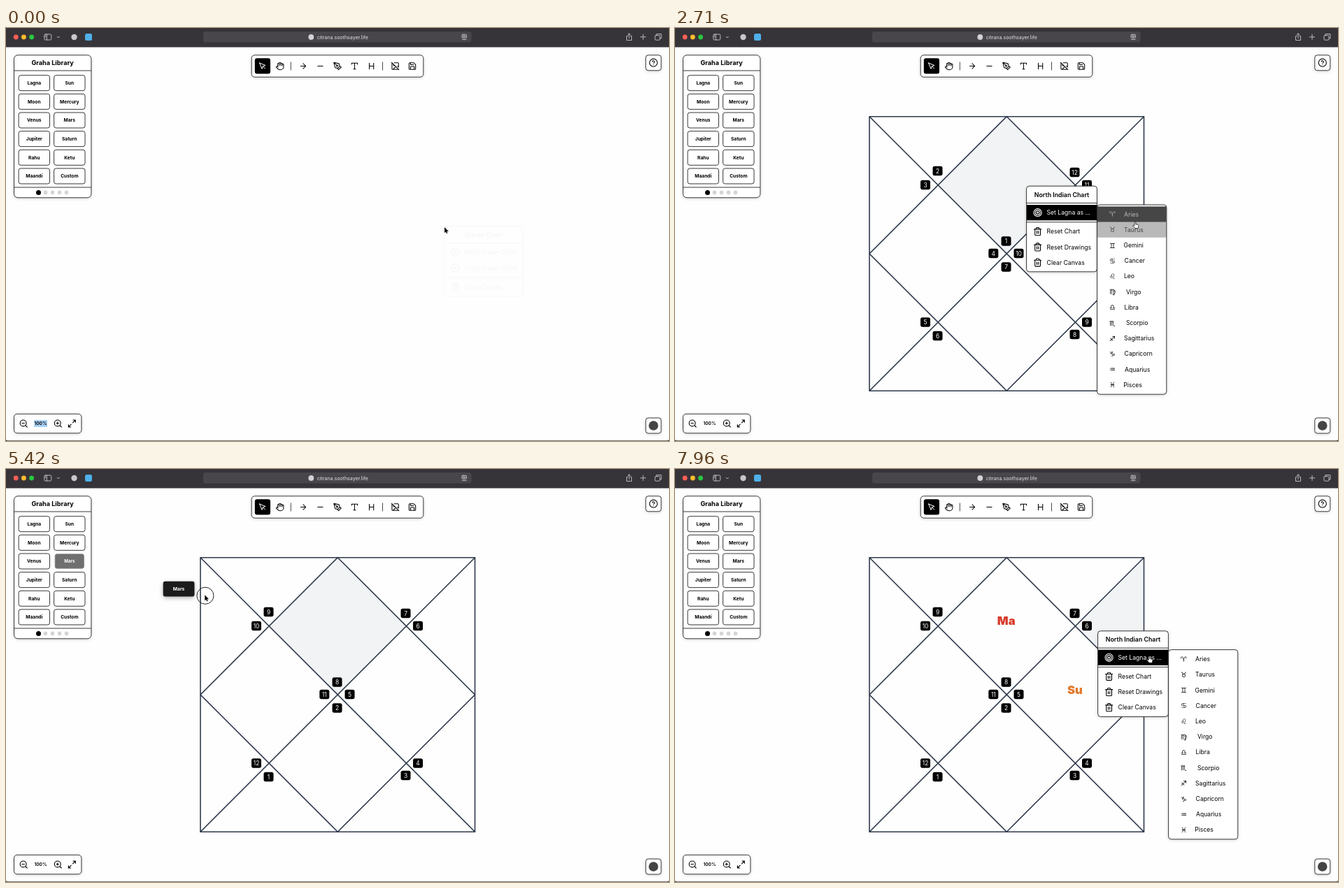
An HTML page for the animation above (8 s loop, 948x591 px).

```html
<!DOCTYPE html>
<html lang="en">
<head>
<meta charset="utf-8">
<title>Chart canvas</title>
<style>
  html, body { margin: 0; width: 100%; height: 100%; overflow: hidden; background: #fefefe; }
  svg { display: block; width: 948px; height: 591px; font-family: Inter, sans-serif; }
  .panel { fill: #fff; stroke: #222; stroke-width: .9; filter: drop-shadow(0 1.5px 2px rgba(0,0,0,.16)); }
  .rule { stroke: #222; stroke-width: .9; }
  .icon { fill: none; stroke: currentColor; stroke-width: 2; stroke-linecap: round; stroke-linejoin: round; }
</style>
</head>
<body>
<svg id="stage" viewBox="0 0 948 591"></svg>
<script>
const LOOP = 8000;
const stage = document.getElementById('stage');

function el(parent, tag, attrs = {}, text) {
  const node = document.createElementNS('http://www.w3.org/2000/svg', tag);
  for (const k in attrs) node.setAttribute(k, attrs[k]);
  if (text !== undefined) node.textContent = text;
  parent.appendChild(node);
  return node;
}
const set = (node, attrs) => { for (const k in attrs) node.setAttribute(k, attrs[k]); };
const group = (parent, attrs) => el(parent, 'g', attrs);
const rect = (parent, x, y, width, height, rx, attrs) => el(parent, 'rect', { x, y, width, height, rx, ...attrs });
const circle = (parent, cx, cy, r, attrs) => el(parent, 'circle', { cx, cy, r, ...attrs });
const path = (parent, d, attrs) => el(parent, 'path', { d, ...attrs });
const rule = (parent, x1, y, x2) => el(parent, 'line', { x1, y1: y, x2, y2: y, class: 'rule' });
// y is the vertical middle of the capitals
const label = (parent, str, x, y, size, weight, attrs) =>
  el(parent, 'text', { x, y: y + size * .364, 'font-size': size, 'font-weight': weight, 'text-anchor': 'middle', fill: 'currentColor', ...attrs }, str);

const clamp = v => Math.max(0, Math.min(1, v));
const fade = (t, a, b) => clamp((t - a) / 150) * (1 - clamp((t - b) / 100));
const glow = (t, spans) => spans.reduce((m, [a, b]) => Math.max(m, clamp((t - a) / 150) - clamp((t - b) / 150)), 0);
const grey = v => { const c = Math.round(255 * v); return `rgb(${c},${c},${c})`; };
const ring = (cx, cy, r) => `M${cx - r} ${cy}a${r} ${r} 0 1 0 ${2 * r} 0a${r} ${r} 0 1 0 ${-2 * r} 0`;

const ICONS = {
  pointer: 'M3 3l7.07 16.97 2.51-7.39 7.39-2.51L3 3zM13 13l6 6',
  hand: 'M18 11V6a2 2 0 0 0-4 0M14 10V4a2 2 0 0 0-4 0v2M10 10.5V6a2 2 0 0 0-4 0v8M18 8a2 2 0 1 1 4 0v6a8 8 0 0 1-8 8h-2c-2.8 0-4.5-.86-5.99-2.34l-3.6-3.6a2 2 0 0 1 2.83-2.82L7 15',
  arrow: 'M5 12h14M12 5l7 7-7 7',
  minus: 'M5 12h14',
  pen: 'M12 19l7-7 3 3-7 7-3-3zM18 13l-1.5-7.5L2 2l3.5 14.5L13 18l5-5zM2 2l7.586 7.586' + ring(11, 11, 2),
  type: 'M4 7V4h16v3M9 20h6M12 4v16',
  heading: 'M6 12h12M6 20V4M18 20V4',
  noImage: 'M2 2l20 20M10.41 10.41a2 2 0 1 1-2.83-2.83M13.5 13.5L6 21M18 12l3 3M3.59 3.59A2 2 0 0 0 3 5v14a2 2 0 0 0 2 2h14c.55 0 1.05-.22 1.41-.59M21 15V5a2 2 0 0 0-2-2H9',
  save: 'M15.2 3a2 2 0 0 1 1.4.6l3.8 3.8a2 2 0 0 1 .6 1.4V19a2 2 0 0 1-2 2H5a2 2 0 0 1-2-2V5a2 2 0 0 1 2-2zM17 21v-7a1 1 0 0 0-1-1H8a1 1 0 0 0-1 1v7M7 3v4a1 1 0 0 0 1 1h7',
  zoomOut: ring(11, 11, 8) + 'M21 21l-4.35-4.35M8 11h6',
  zoomIn: ring(11, 11, 8) + 'M21 21l-4.35-4.35M8 11h6M11 8v6',
  expand: 'M15 3h6v6M9 21H3v-6M21 3l-7 7M3 21l7-7',
  help: ring(12, 12, 10) + 'M9.09 9a3 3 0 0 1 5.83 1c0 2-3 3-3 3M12 17h.01',
  trash: 'M3 6h18M19 6v14a2 2 0 0 1-2 2H7a2 2 0 0 1-2-2V6M8 6V4a2 2 0 0 1 2-2h4a2 2 0 0 1 2 2v2M10 11v6M14 11v6',
  target: ring(12, 12, 10) + ring(12, 12, 6) + ring(12, 12, 2),
  plus: ring(12, 12, 10) + 'M8 12h8M12 8v8'
};
const icon = (parent, name, x, y, s = .554, attrs) =>
  path(parent, ICONS[name], { class: 'icon', transform: `translate(${x - 12 * s} ${y - 12 * s}) scale(${s})`, ...attrs });

// Browser bar
rect(stage, 0, 0, 948, 591, 0, { fill: '#fefefe' });
rect(stage, 0, 0, 948, 27.5, 0, { fill: '#373439' });
['#ff5f57', '#febc2e', '#28c840'].forEach((fill, i) => circle(stage, 14.2 + 11.2 * i, 13, 3.4, { fill }));
const bar = group(stage, { fill: 'none', stroke: '#c9c7ca', 'stroke-width': .9, 'stroke-linecap': 'round' });
rect(bar, 54.8, 9, 10, 8, 1.5);
path(bar, 'M58.3 9v8M56 11h1M56 12.8h1M73.2 12.3l1.6 1.7 1.6-1.7');
circle(bar, 97.5, 13, 4.2, { fill: '#c9c7ca', stroke: 'none' });
rect(bar, 113, 8, 10, 10, 2.5, { fill: '#4fb0ea', stroke: 'none' });
rect(bar, 282, 5, 383.5, 15.5, 3.5, { fill: '#49464b', stroke: 'none' });
circle(bar, 436.3, 13, 3.9, { fill: '#d4d2d5', stroke: 'none' });
rect(bar, 652, 9.3, 6.5, 5, 1);
path(bar, 'M653.5 11h3.5M653.5 12.6h3.5M652.5 16.5h5.5');
path(bar, 'M889 11.5h-1.5v6h7v-6h-1.5M891 14.5V8M889 9.8l2-2 2 2M907.3 12.8h7.4M911 9.1v7.4M930 10.5V8.6h7v6.3h-1.8');
rect(bar, 928, 10.6, 7, 6.6, 1.2);
label(stage, 'citrana.soothsayer.life', 481.2, 13, 7.05, 400, { fill: '#e4e2e5' });

// Chart
const X0 = 278, Y0 = 126.7, U = 196.25;
const CENTERS = [[1, .5], [.5, 0], [0, .5], [.5, 1], [0, 1.5], [.5, 2], [1, 1.5], [1.5, 2], [2, 1.5], [1.5, 1], [2, .5], [1.5, 0]];
const TAGS = [[473.5, 305], [375.5, 204.5], [358, 224.5], [455.3, 322.5], [358, 421], [375.5, 440.5],
  [473.5, 342], [571.5, 438.5], [589, 421], [491.5, 322.5], [589, 224.5], [571.5, 206.5]];
const clip = el(el(stage, 'defs'), 'clipPath', { id: 'square' });
rect(clip, X0, Y0, 2 * U, 2 * U, 0);
const chart = group(stage);
const lit = path(group(chart, { 'clip-path': 'url(#square)' }), '', { fill: '#f1f3f5' });
path(chart, 'M0 0H2V2H0ZL2 2M2 0L0 2M1 0L2 1 1 2 0 1Z', {
  transform: `translate(${X0} ${Y0}) scale(${U})`, fill: 'none', stroke: '#2f3a4b', 'stroke-width': 1.6 / U
});
const numbers = TAGS.map(([x, y]) => {
  rect(chart, x - 7, y - 6.8, 14, 13.6, 2.8, { fill: '#000' });
  return label(chart, '', x, y, 8.4, 400, { fill: '#fff' });
});
const mars = label(chart, 'Ma', 473.7, 217.3, 16.6, 900, { fill: '#d83a2b' });
const sun = label(chart, 'Su', 571.8, 315.8, 16.6, 900, { fill: '#e37a2c' });

// Library
rect(stage, 11.5, 38.8, 110.4, 204, 5.5, { class: 'panel' });
rule(stage, 11.5, 61, 121.9);
rule(stage, 11.5, 228, 121.9);
label(stage, 'Graha Library', 66.6, 49.8, 9.1, 700);
const buttons = {};
'Lagna Sun Moon Mercury Venus Mars Jupiter Saturn Rahu Ketu Maandi Custom'.split(' ').forEach((name, i) => {
  const x = i % 2 ? 90.8 : 40.3, y = 78.7 + 26.65 * (i >> 1);
  const g = group(stage);
  const box = rect(g, -22.2, -11, 44.4, 22, 3, { fill: '#fff', stroke: '#222', 'stroke-width': .9 });
  label(g, name, 0, 0, 6.65, 700);
  set(g, { transform: `translate(${x} ${y})` });
  buttons[name] = { g, box, x, y };
});
for (let i = 0; i < 5; i++) circle(stage, 46.5 + 10 * i, 235.4, i ? 2.8 : 3.5, { fill: i ? '#d4d4d4' : '#000' });

// Toolbar and corner controls
rect(stage, 351.2, 38.8, 245.6, 31.4, 4.5, { class: 'panel' });
rect(stage, 355.8, 43.3, 22.2, 22.2, 3, { fill: '#000' });
icon(stage, 'pointer', 367, 54.5, .5, { color: '#fff' });
[['hand', 391.7], ['arrow', 425], ['minus', 449.4], ['pen', 474], ['type', 498.4], ['heading', 522.6], ['noImage', 556.6], ['save', 581]]
  .forEach(([name, x]) => icon(stage, name, x, 54.5, .52));
path(stage, 'M407.3 48.5v12M538.5 48.5v12', { stroke: '#333', 'stroke-width': .9 });
rect(stage, 914.8, 38.8, 22, 22, 3.5, { class: 'panel' });
icon(stage, 'help', 925.8, 49.7);
rect(stage, 914.8, 558, 22, 22, 3.5, { class: 'panel' });
circle(stage, 925.8, 569, 6.8, { fill: '#444' });
rect(stage, 11.5, 552.3, 96.4, 27.5, 4.5, { class: 'panel' });
icon(stage, 'zoomOut', 25.2, 566);
icon(stage, 'zoomIn', 74.3, 566);
icon(stage, 'expand', 94.3, 566);
const selection = rect(stage, 40, 561, 19, 10, 0, { fill: '#a9d1f5' });
label(stage, '100%', 49.5, 566, 6.65, 600);
path(stage, 'M0 588Q0 591 3 591H0ZM948 588Q948 591 945 591H948Z', { fill: '#111' });
rule(stage, 0, 590.8, 948);

// Menus
function row(menu, w, y, h = 22.2) {
  const g = group(menu);
  return { g, back: rect(g, .4, y - h / 2, w - .8, h, 0, { fill: '#000' }) };
}
function makeMenu(w, h, title, lines, items) {
  const g = group(stage);
  rect(g, 0, 0, w, h, 4, { class: 'panel' });
  label(g, title, w / 2, 12.4, 8.8, 600);
  lines.forEach(y => rule(g, 0, y, w));
  const rows = items.map(([name, text, y]) => {
    const r = row(g, w, y);
    icon(r.g, name, 16, y);
    label(r.g, text, 29, y, 8.6, 400, { 'text-anchor': 'start' });
    return r;
  });
  return { g, rows };
}
const createMenu = makeMenu(113.4, 100.8, 'Create Chart', [24.3, 73.8],
  [['plus', 'North Indian Chart', 38], ['plus', 'South Indian Chart', 60.2], ['trash', 'Clear Canvas', 87.5]]);
set(createMenu.g, { transform: 'translate(626.2 283.2)' });
const chartMenu = makeMenu(100.8, 122.6, 'North Indian Chart', [24.3, 51.6],
  [['target', 'Set Lagna as ...', 38], ['trash', 'Reset Chart', 65], ['trash', 'Reset Drawings', 87.2], ['trash', 'Clear Canvas', 109.4]]);

const signMenu = group(stage);
rect(signMenu, 0, 0, 99.2, 271.2, 4, { class: 'panel' });
const SIGNS = [['Aries', 38.5], ['Taurus', 38.5], ['Gemini', 38], ['Cancer', 39], ['Leo', 38.3], ['Virgo', 41.3],
  ['Libra', 39], ['Scorpio', 41.3], ['Sagittarius', 38.5], ['Capricorn', 39], ['Aquarius', 39.5], ['Pisces', 37.7]];
const signRows = SIGNS.map(([name, x], i) => {
  const y = 13.5 + 22.2 * i, r = row(signMenu, 99.2, y);
  label(r.g, String.fromCodePoint(0x2648 + i) + '\uFE0E', 22, y, 10, 400, { 'font-family': '"DejaVu Sans", sans-serif' });
  label(r.g, name, x, y, 8.6, 400, { 'text-anchor': 'start' });
  return r;
});
function tint(r, a) {
  set(r.back, { opacity: a });
  set(r.g, { color: grey(a) });
}

// Dragged chip, press ring and cursor
const chip = group(stage);
rect(chip, -22.4, -10.8, 44.8, 21.6, 3, { fill: '#1b1b1b', style: 'filter:drop-shadow(0 2px 3px rgba(0,0,0,.3))' });
const chipText = label(chip, '', 0, 0, 6.65, 700, { fill: '#fff' });
const press = circle(stage, 0, 0, 12, { fill: 'none', stroke: '#222', 'stroke-width': 1 });
const cursor = group(stage, { 'stroke-linejoin': 'round' });
const shapes = {
  arrow: path(cursor, 'M0 0V8.2L1.9 6.5 3.1 9.2 4.4 8.6 3.2 6 5.8 5.9Z', { fill: '#000', stroke: '#fff', 'stroke-width': .7, 'paint-order': 'stroke' }),
  point: path(cursor, 'M-.9.8a.9.9 0 0 1 1.8 0V3.5l3 .7c.9.3 1.2.8 1 1.7L4.2 9.3H0L-2.9 6c-.6-.9.3-1.5 1-1l1 .7Z', { fill: '#fff', stroke: '#222', 'stroke-width': .8 }),
  grab: path(cursor, 'M-2.2 3V1.2q.7-1 1.4 0V.4Q0-.6.8.4v.5q.8-.8 1.5.2v.8q.9-.6 1.4.3V5.5L2.8 8.5H-1.3L-4 5.2q-.2-1.2 1-.8l.8.7Z', { fill: '#fff', stroke: '#333', 'stroke-width': .8 })
};

const KEYS = [[0, 627, 285], [80, 627, 285], [300, 648, 325], [480, 662, 346], [700, 664, 331], [830, 664, 327], [900, 664, 327],
  [1150, 640, 300], [1600, 503, 227], [1720, 503, 227], [1900, 545, 262], [2100, 600, 266], [2400, 655, 270], [2630, 655, 270],
  [2710, 658, 277], [3050, 655, 418], [3150, 658, 419], [3290, 673, 424], [3420, 655, 380], [3700, 560, 290], [4040, 473, 214],
  [4710, 473, 214], [4860, 300, 170], [5020, 90, 132], [5330, 90, 132], [5420, 283, 180], [5640, 474, 217], [5700, 474, 217],
  [5930, 598, 326], [6000, 589, 320.5], [6500, 589, 320.5], [6720, 90, 80], [6880, 90, 80], [7050, 330, 200], [7240, 592, 324],
  [7340, 592, 324], [7560, 605, 233], [7640, 605, 233], [7760, 650, 262], [7900, 678, 268], [8000, 678, 268]];

function slope(i, k) {
  const a = KEYS[i - 1], b = KEYS[i], c = KEYS[i + 1];
  if (!a || !c || (a[1] === b[1] && a[2] === b[2]) || (b[1] === c[1] && b[2] === c[2])) return 0;
  return (c[k] - a[k]) / (c[0] - a[0]);
}
function cursorAt(t) {
  let i = 0;
  while (i < KEYS.length - 2 && KEYS[i + 1][0] <= t) i++;
  const a = KEYS[i], b = KEYS[i + 1], d = b[0] - a[0], s = clamp((t - a[0]) / d), s2 = s * s, s3 = s2 * s;
  return [1, 2].map(k => (2 * s3 - 3 * s2 + 1) * a[k] + (s3 - 2 * s2 + s) * d * slope(i, k)
    + (3 * s2 - 2 * s3) * b[k] + (s3 - s2) * d * slope(i + 1, k));
}

// Open menus and drags keep the last hovered house
const LATCHES = [[1640, 3160], [4700, 5700], [6500, 7340], [7620, 8000]];
function houseAt(t) {
  const held = LATCHES.find(([a, b]) => t >= a && t < b);
  const [x, y] = cursorAt(held ? held[0] : t);
  const u = (x - X0) / U, v = (y - Y0) / U;
  if (u < 0 || v < 0 || u > 2 || v > 2) return null;
  return CENTERS.find(([a, b]) => Math.abs(u - a) + Math.abs(v - b) <= .5);
}

const DRAGS = [
  { name: 'Mars', hover: 5000, down: 5020, from: 5330, to: 5670 },
  { name: 'Sun', hover: 6700, down: 6770, from: 6880, to: 7330 }
];
const POINTING = [[130, 930], [1830, 3160], [7720, 8000]];
const GRABBING = [[3160, 3340], [5000, 5330], [6700, 6880]];
const within = (t, spans) => spans.some(([a, b]) => t >= a && t < b);

function draw(t) {
  const [x, y] = cursorAt(t);
  set(selection, { opacity: t < 900 ? 1 : 0 });

  set(chart, { opacity: clamp((t - 920) / 60) });
  const house = t > 1000 && houseAt(t);
  set(lit, { d: house ? `M${X0 + house[0] * U} ${Y0 + (house[1] - .5) * U}l${U / 2} ${U / 2} ${-U / 2} ${U / 2} ${-U / 2} ${-U / 2}Z` : '' });
  numbers.forEach((n, i) => { n.textContent = t < 3160 ? i + 1 : (i + 7) % 12 + 1; });
  set(mars, { opacity: t < 5680 ? 0 : 1 });
  set(sun, { opacity: t < 7340 ? 0 : 1 });

  set(createMenu.g, { opacity: fade(t, -3, 900) });
  const north = glow(t, [[180, 400], [700, 9e3]]), south = glow(t, [[400, 700]]);
  [north, south, 0].forEach((a, i) => tint(createMenu.rows[i], a));

  const late = t > 5000, mx = late ? 604.6 : 502.6, my = late ? 231.8 : 226.2;
  set(chartMenu.g, { opacity: late ? fade(t, 7620, 9e3) : fade(t, 1640, 3130), transform: `translate(${mx} ${my})` });
  const lagna = glow(t, [[1830, 5e3], [7720, 9e3]]);
  chartMenu.rows.forEach((r, i) => tint(r, i ? 0 : lagna));
  set(signMenu, { opacity: late ? fade(t, 7780, 9e3) : fade(t, 1900, 3130), transform: `translate(${mx + 101} ${my + 26.8})` });
  signRows.forEach((r, i) => {
    const enter = i ? 2670 + (i - 1) * 57 : 2150, leave = i < 7 ? 2670 + i * 57 : 5000;
    tint(r, late || i > 7 ? 0 : glow(t, [[enter, leave]]));
  });

  let ringAlpha = 0, dragged = null;
  for (const d of DRAGS) {
    const b = buttons[d.name], over = t >= d.hover && t < d.to, moving = t >= d.from && t < d.to;
    set(b.g, { color: over ? '#fff' : '#000', opacity: moving ? .56 : 1, transform: `translate(${b.x} ${b.y}) scale(${moving ? .93 : 1})` });
    set(b.box, { fill: over ? '#000' : '#fff' });
    ringAlpha = Math.max(ringAlpha, clamp((t - d.down) / 60) - clamp((t - d.to) / 150));
    if (moving) dragged = d;
  }
  set(chip, { opacity: dragged ? 1 : 0 });
  if (dragged) {
    const [cx, cy] = cursorAt(Math.max(dragged.from, t - 15));
    chipText.textContent = dragged.name;
    set(chip, { transform: `translate(${cx - 11} ${cy - 2.5})` });
  }
  set(press, { cx: x + .7, cy: y + 1, opacity: ringAlpha });

  const kind = within(t, POINTING) ? 'point' : within(t, GRABBING) ? 'grab' : 'arrow';
  for (const k in shapes) set(shapes[k], { visibility: k === kind ? 'visible' : 'hidden' });
  set(cursor, { transform: `translate(${x} ${y})` });
}

const start = performance.now();
function tick() {
  draw((performance.now() - start) % LOOP);
  requestAnimationFrame(tick);
}
tick();
</script>
</body>
</html>
```
